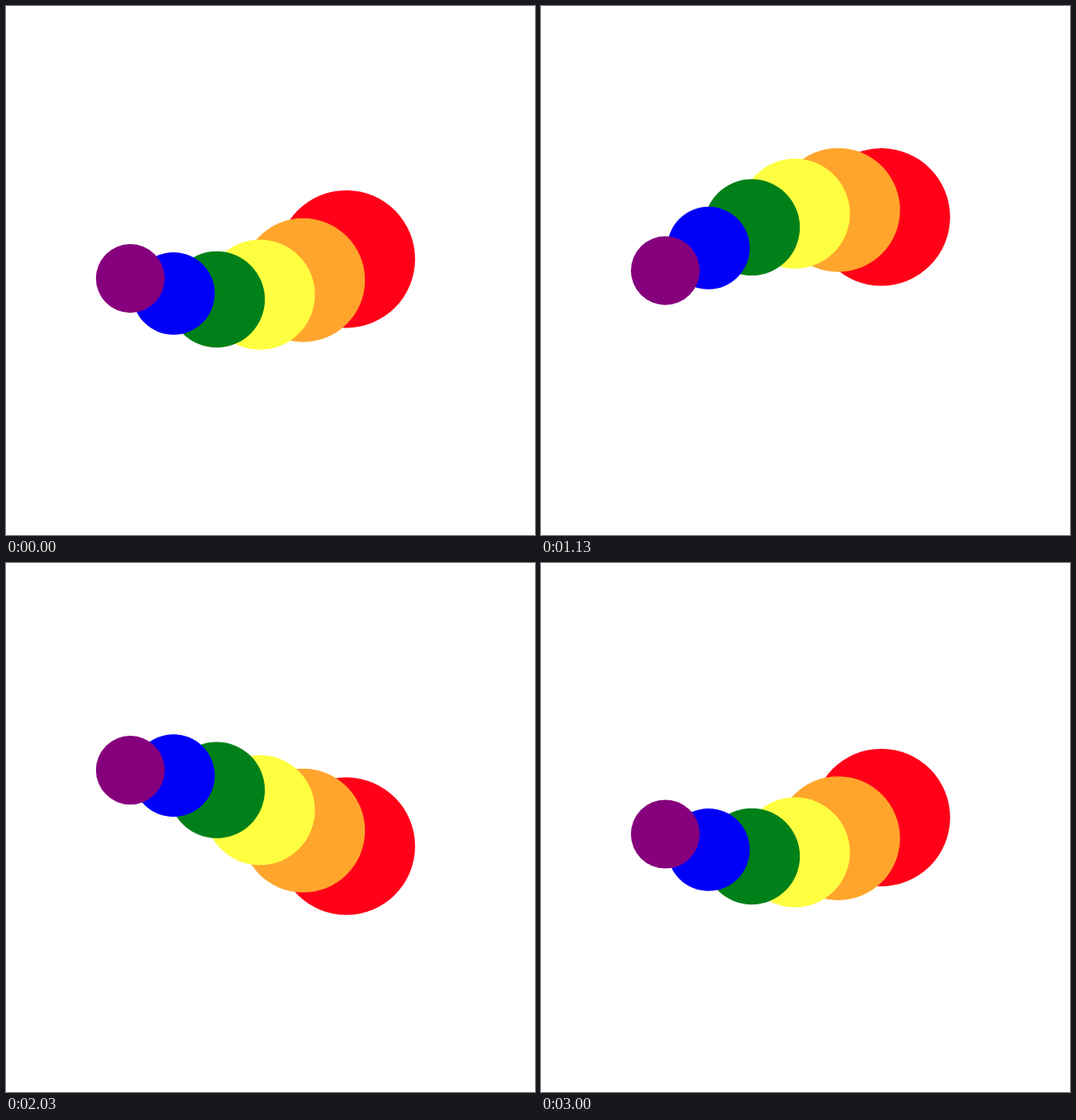
Recreate the animation shown at these times as an HTML page with a canvas. Size 640 px wide and 640 px high, loop 3.03 s.

```html
<!DOCTYPE html>
<html>
<head>
<meta charset="utf-8">
<style>
html, body { margin: 0; width: 100%; height: 100%; overflow: hidden; background: #fff; }
canvas { display: block; }
</style>
</head>
<body>
<canvas id="stage" width="640" height="640"></canvas>
<script>
const LOOP = 3030, TICK = 40;
const colors = ['#86007d', '#0000f9', '#008018', '#ffff41', '#ffa52c', '#ff0018'];
const ctx = document.getElementById('stage').getContext('2d');
ctx.scale(16 / 15, 16 / 15);

function draw(t) {
  // the wave advances 1/12 rad per tick; the first tick is 10 ms short
  const phase = Math.floor((t + 10) / TICK) / 12;
  ctx.clearRect(0, 0, 600, 600);
  for (let i = colors.length; i > 0; i--) {
    const x = 92 + 49 * i;
    const y = 286 - i + 50 * Math.sin(i / 2 + phase);
    ctx.fillStyle = colors[i - 1];
    ctx.beginPath();
    ctx.arc(x, y, 31.2 + 7.8 * i, 0, 2 * Math.PI);
    ctx.fill();
  }
}

const start = performance.now();
function animate() {
  draw((performance.now() - start) % LOOP);
  requestAnimationFrame(animate);
}
animate();
</script>
</body>
</html>
```
